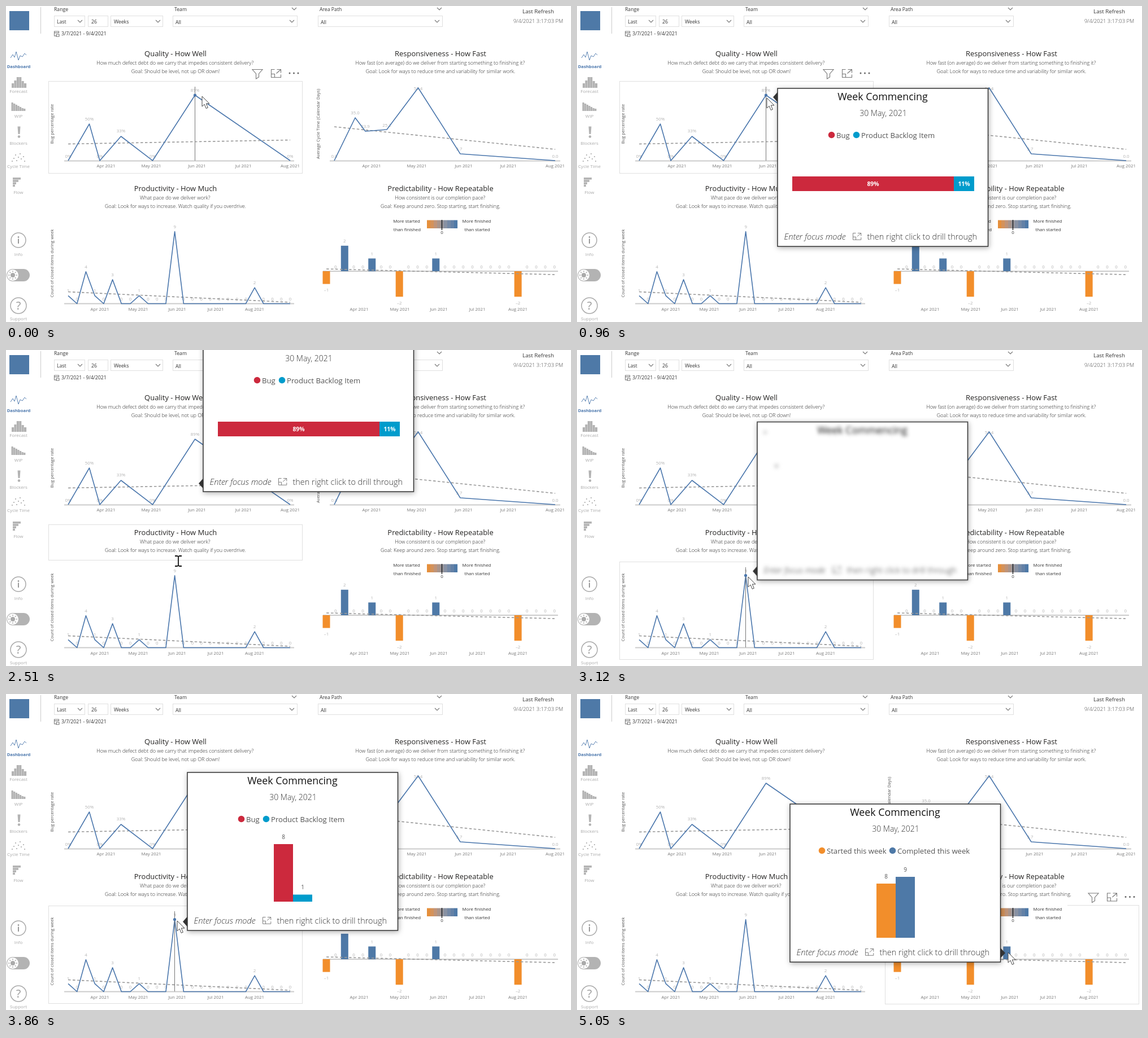
An HTML page for the animation above (5.91 s loop, 1000 px wide and 560 px high).

```html
<!DOCTYPE html>
<html lang="en">
<head>
<meta charset="utf-8">
<title>Flow metrics dashboard</title>
<style>
html, body { margin: 0; width: 100%; height: 100%; overflow: hidden; background: #fff; }
svg { display: block; width: 1000px; height: 560px; font-family: "Open Sans", "Noto Sans", sans-serif; }
text { white-space: pre; }
.mid { text-anchor: middle; }
.title { font-size: 12.95px; fill: #252423; }
.sub { font-size: 9px; font-weight: 300; fill: #222; }
.axis { font-size: 7.8px; fill: #777; }
.side { font-size: 7.5px; fill: #555; }
.val { font-size: 7.9px; fill: #b2b2b2; }
.key { font-size: 7.9px; fill: #333; }
.nav { font-size: 8px; fill: #aaa; }
.nav.on { font-size: 7.7px; font-weight: 700; fill: #4a76ac; }
.head { font-size: 8.7px; fill: #333; }
.refresh { font-size: 9.75px; fill: #333; }
.stamp { font-size: 9.4px; font-weight: 300; fill: #444; }
.week { font-size: 17.8px; fill: #111; }
.date { font-size: 14px; font-weight: 300; fill: #333; }
.legend { font-size: 13.15px; fill: #555; }
.foot { font-size: 14.45px; font-weight: 300; fill: #333; }
.foot .em { font-size: 14.8px; font-style: italic; }
.num { font-size: 10px; fill: #555; }
.pct { font-size: 10.3px; font-weight: 700; fill: #fff; }
.wait { font-size: 13.3px; fill: #b8b8b8; }
.card { fill: #fff; stroke: #333; stroke-width: 1.5; filter: drop-shadow(1px 2px 5px rgba(0, 0, 0, .32)); }
.line { fill: none; stroke: #4a76ac; stroke-width: 1.6; stroke-linejoin: round; }
.line.thin { stroke-width: .9; }
.base { stroke: #ccc; stroke-width: 2.2; }
.trend { stroke: #999; stroke-width: 1.6; stroke-dasharray: 4.5 3.5; }
.edge { fill: none; stroke: #e0e0e0; }
.ico { fill: none; stroke: #777; stroke-width: 1.1; }
.grey { fill: #b3b3b3; }
.ring { fill: none; stroke: #aaa; stroke-width: 1.5; }

.anim, .tip, .tip .body, .tip .data, .tip .load, .tip .arrow, .late {
  animation: 5.91s step-end infinite;
}
.hoverA { animation-name: hoverA; }
.hoverT { animation-name: hoverT; }
.hoverB { animation-name: hoverB; }
.hoverC { animation-name: hoverC; }
@keyframes hoverA { 0% { opacity: 1 } 41.286%, 100% { opacity: 0 } }
@keyframes hoverT { 0% { opacity: 0 } 42.47% { opacity: 1 } 52.792%, 100% { opacity: 0 } }
@keyframes hoverB { 0% { opacity: 0 } 52.792% { opacity: 1 } 82.064%, 100% { opacity: 0 } }
@keyframes hoverC { 0% { opacity: 0 } 83.249%, 100% { opacity: 1 } }

.tipA { animation-name: tipA; }
.tipA .arrow { animation-name: arrowA; }
.tipA .body { animation-name: bodyA; }
.tipA .data { animation-name: dataA; }
.tipA .load { animation-name: loadA; }
@keyframes tipA {
  0% { opacity: 0; transform: translate(373px, 146px) }
  1.184% { opacity: .4; transform: translate(373px, 146px) }
  2.369% { opacity: .75; transform: translate(373px, 146px) }
  3.384% { opacity: 1; transform: translate(373px, 146px) }
  8.291% { opacity: 1; transform: translate(355px, 146px) }
  37.733% { opacity: 1; transform: translate(355px, 147px) }
  38.917% { opacity: 1; transform: translate(349px, -29px) }
  52.792%, 100% { opacity: 0; transform: translate(349px, -29px) }
}
@keyframes arrowA { 0% { transform: none } 38.917%, 100% { transform: translateY(250px) } }
@keyframes bodyA { 0% { filter: blur(3px) } 15.228% { filter: blur(1.5px) } 16.244%, 100% { filter: none } }
@keyframes dataA { 0% { opacity: 0 } 15.228%, 100% { opacity: 1 } }
@keyframes loadA { 0% { opacity: 0 } 10.66% { opacity: 1 } 15.228%, 100% { opacity: 0 } }

.tipB { animation-name: tipB; }
.tipB .body { animation-name: bodyB; }
.tipB .data { animation-name: dataB; }
.tipB .load { animation-name: loadB; }
.tipB .date { animation: lateB 5.91s step-end infinite; }
.late { animation-name: blobs; }
@keyframes tipB {
  0% { opacity: 0; transform: translate(319px, 127.5px) }
  52.792% { opacity: 1; transform: translate(319px, 127.5px) }
  57.53% { opacity: 1; transform: translate(321px, 139px) }
  80.88%, 100% { opacity: 0; transform: translate(321px, 139px) }
}
@keyframes bodyB { 0% { filter: blur(3px) } 63.62% { filter: blur(1.2px) } 65.313%, 100% { filter: none } }
@keyframes dataB { 0% { opacity: 0 } 62.098%, 100% { opacity: 1 } }
@keyframes loadB { 0% { opacity: 0 } 57.53% { opacity: 1 } 62.098%, 100% { opacity: 0 } }
@keyframes lateB { 0% { opacity: 0 } 57.53%, 100% { opacity: 1 } }
@keyframes blobs { 0% { opacity: 1 } 55.161%, 100% { opacity: 0 } }

.tipC { animation-name: tipC; }
.tipC .body { animation-name: bodyC; }
.tipC .data { animation-name: dataC; }
.tipC .load { animation-name: loadC; }
@keyframes tipC {
  0% { opacity: 0; transform: translate(377px, 195px) }
  83.249%, 100% { opacity: 1; transform: translate(377px, 195px) }
}
@keyframes bodyC { 0% { filter: blur(3px) } 84.264% { filter: blur(1.2px) } 85.448%, 100% { filter: none } }
@keyframes dataC { 0% { opacity: 0 } 84.264%, 100% { opacity: 1 } }
@keyframes loadC { 0% { opacity: 1 } 84.264%, 100% { opacity: 0 } }

.mouse { animation-name: mouse; }
.pointer { animation-name: pointer; }
.beam { animation-name: beam; }
@keyframes mouse {
  0% { transform: translate(347px, 160px) }
  3.384% { transform: translate(348px, 161px) }
  8.291% { transform: translate(337px, 162px) }
  10.66% { transform: translate(333px, 162px) }
  12.86% { transform: translate(336px, 163px) }
  36.548% { transform: translate(335px, 178px) }
  37.733% { transform: translate(333px, 200px) }
  38.917% { transform: translate(330px, 234px) }
  40.102% { transform: translate(323px, 282px) }
  41.286% { transform: translate(313px, 333px) }
  42.47% { transform: translate(305px, 374px) }
  43.486% { transform: translate(303px, 386px) }
  44.67% { transform: translate(301px, 394px) }
  45.854% { transform: translate(300px, 398px) }
  47.039% { transform: translate(301px, 400px) }
  48.223% { transform: translate(302px, 401px) }
  49.408% { transform: translate(303px, 402px) }
  80.88% { transform: translate(420px, 422px) }
  82.064% { transform: translate(610px, 446px) }
  83.249% { transform: translate(738px, 458px) }
  84.264% { transform: translate(759px, 459px) }
  85.448%, 100% { transform: translate(763px, 458px) }
}
@keyframes pointer { 0% { opacity: 1 } 41.286% { opacity: 0 } 44.67%, 100% { opacity: 1 } }
@keyframes beam { 0% { opacity: 0 } 41.286% { opacity: 1 } 44.67%, 100% { opacity: 0 } }
</style>
</head>
<body>
<svg viewBox="0 0 1000 560"></svg>
<script>
const BLUE = '#4e79a7', ORANGE = '#f28e2b', RED = '#cc293d', CYAN = '#009ccc';
const MONTHS = ['Apr', 'May', 'Jun', 'Jul', 'Aug'];

const text = (x, y, s, cls) => `<text x="${x}" y="${y}" class="${cls}">${s}</text>`;
const mid = (x, y, s, cls) => text(x, y, s, 'mid ' + cls);
const rect = (x, y, w, h, fill) => `<rect x="${x}" y="${y}" width="${w}" height="${h}" fill="${fill}"/>`;
const edge = (x, y, w, h) => `<rect class="edge" x="${x}" y="${y}" width="${w}" height="${h}"/>`;
const seg = (x1, y1, x2, y2, cls) => `<line x1="${x1}" y1="${y1}" x2="${x2}" y2="${y2}" class="${cls}"/>`;
const dot = (x, y, r, fill) => `<circle cx="${x}" cy="${y}" r="${r}" fill="${fill}"/>`;
const path = (d, cls = 'ico') => `<path d="${d}" class="${cls}"/>`;
const poly = (pts, cls = 'line') => `<polyline class="${cls}" points="${pts.join(' ')}"/>`;
const side = (x, y, s) => `<text class="mid side" transform="translate(${x} ${y}) rotate(-90)">${s}</text>`;
const months = (xs, y) => xs.map((x, i) => mid(x, y, MONTHS[i] + ' 2021', 'axis')).join('');
const heading = (x, y, title, a, b) =>
  mid(x, y, title, 'title') + mid(x - .7, y + 15.3, a, 'sub') + mid(x, y + 30.3, b, 'sub');
const chevron = (x, y) => path(`M${x - 4} ${y - 2}l4 4 4-4`);
const focusIcon = (x, y, k) => `<g transform="translate(${x} ${y}) scale(${k})">` +
  path('M6 0H0V14H17V9M10 0H17V6M17 0L9 7M0 8H6V14') + '</g>';
const tools = (dx, dy) => `<g transform="translate(${dx} ${dy})">` +
  path('M436 112.500H454L447.500 120V126L442.500 129V120Z') + focusIcon(469.500, 112.500, 1) +
  [502, 509.500, 517].map(x => dot(x, 119, 1.5, '#666')).join('') + '</g>';

function header() {
  const boxes = [[85, 55], [145, 36], [185, 93], [295, 221], [552, 221]];
  return rect(6, 9, 35, 34, BLUE) +
    '<path d="M61.500 2V49" stroke="#ccc"/>' +
    boxes.map(([x, w]) => edge(x + .5, 17.5, w - 1, 19)).join('') +
    [[131, 27], [269, 27], [506, 27], [763, 27], [510, 5], [767, 5]].map(p => chevron(...p)).join('') +
    text(85, 8.5, 'Range', 'head') + text(298, 8.5, 'Team', 'head') + text(555, 8.5, 'Area Path', 'head') +
    text(90, 30.5, 'Last', 'head') + text(151, 30.5, '26', 'head') + text(191, 30.5, 'Weeks', 'head') +
    text(300, 31.5, 'All', 'head') + text(557, 31.5, 'All', 'head') +
    path('M90 53H85.500V45H93.500V48M85.500 47.500H93.500M89 50H94V54H89Z') +
    text(98, 52, '3/7/2021 - 9/4/2021', 'head') +
    mid(942, 13, 'Last Refresh', 'refresh') + mid(942, 30, '9/4/2021 3:17:03 PM', 'stamp');
}

function nav() {
  const names = [['Forecast', 154], ['WIP', 197.5], ['Blockers', 246], ['Cycle Time', 287],
    ['Flow', 333], ['Info', 443], ['Support', 557]];
  const bars = (list, x, y, step) =>
    list.map((h, i) => rect(x + i * step, y - h, step - .3, h, '#b3b3b3')).join('');
  const rays = [...Array(8)].map((_, i) =>
    `<path d="M0-5.500V-8" transform="translate(12 477) rotate(${i * 45})" stroke="#aaa" stroke-width="1.4"/>`).join('');
  return mid(22.5, 109.5, 'Dashboard', 'nav on') +
    names.map(([s, y]) => mid(22, y, s, 'nav')).join('') +
    poly(['8,92', '12,86', '15,91', '18,81', '22,96', '25,88', '29,90', '33,84', '36,87'], 'line thin') +
    bars([8, 13, 19, 19, 12, 8], 10, 145, 4.4) +
    bars([15, 13, 11, 9, 7, 5, 4], 9.5, 186, 3.6) +
    path('M20.500 213.500H25.500L24.500 227H21.500Z', 'grey') + dot(23, 231.5, 2.3, '#b3b3b3') +
    [[11, 275], [14, 270], [17, 264], [19, 274], [22, 268], [25, 262], [27, 271], [31, 267], [33, 275]]
      .map(([x, y]) => dot(x, y, 1.1, '#aaa')).join('') +
    [14, 10, 6, 4].map((w, i) => rect(12, 304 + i * 4.2, w, 3.6, '#b3b3b3')).join('') +
    '<circle class="ring" cx="22" cy="415" r="13"/>' + dot(22, 409.5, 1.3, '#888') +
    '<path d="M22 412.500V421" stroke="#888" stroke-width="1.7"/>' +
    '<rect class="grey" x="1" y="466" width="41" height="22" rx="11"/>' +
    dot(12, 477, 10, '#fff') + dot(12, 477, 4, '#aaa') + rays +
    '<circle class="ring" cx="22" cy="531" r="14"/>' +
    '<text x="22" y="538" class="mid" font-size="20" fill="#999">?</text>';
}

function lineChart(pts, labels, trend, x0, x1) {
  return labels.map(([x, y, s]) => mid(x, y, s, 'val')).join('') +
    seg(x0, 274.5, x1, 274.5, 'base') + seg(...trend, 'trend') + poly(pts);
}

function quality() {
  return heading(300, 89, 'Quality - How Well',
    'How much defect debt do we carry that impedes consistent delivery?',
    'Goal: Should be level, not up OR down!') +
    side(84, 209, 'Bug percentage rate') +
    lineChart(['110,274', '147.5,209', '166,274', '203.5,231', '259.5,274', '334.5,158', '503,274'],
      [[110, 269, '0%'], [147.5, 202.5, '50%'], [166, 269, '0%'], [203.5, 223.5, '33%'],
       [259.5, 269, '0%'], [334.5, 152, '89%'], [503, 269, '0%']],
      [110, 244.5, 503, 237.5], 103, 510) +
    months([177, 257, 338, 420, 503], 286);
}

function response() {
  return heading(769, 89, 'Responsiveness - How Fast',
    'How fast (on average) do we deliver from starting something to finishing it?',
    'Goal: Look for ways to reduce time and variability for similar work.') +
    side(554.5, 209, 'Average Cycle Time (Calendar Days)') +
    lineChart(['581,274', '618,198', '636,222', '674,219', '729.5,145', '804,262', '972,274'],
      [[581, 269, '0.0'], [618, 191.5, '35.0'], [636, 215.5, '23.9'], [674, 213.5, '25.2'],
       [729.5, 149, '53.4'], [802, 256, '5.7'], [972, 269, '0.0']],
      [581, 214, 972, 254], 573, 981) +
    months([647, 727, 810, 889, 972], 286);
}

function productivity() {
  const spikes = { 0: 1, 2: 4, 3: 1, 5: 3, 8: 1, 12: 9, 21: 2 };
  const pts = [...Array(26)].map((_, i) => [110 + i * 15.72, 527.5 - 14.2 * (spikes[i] || 0), spikes[i] || 0]);
  return heading(300, 328, 'Productivity - How Much', 'What pace do we deliver work?',
    'Goal: Look for ways to increase. Watch quality if you overdrive.') +
    side(84, 456, 'Count of closed items during week') +
    pts.map(([x, y, v]) => mid(x, y - 6, v, 'val')).join('') +
    seg(103, 527.5, 510, 527.5, 'base') + seg(110, 506.5, 503, 525, 'trend') +
    poly(pts.map(([x, y]) => x + ',' + y)) +
    months([166, 234, 303, 371, 440], 539.5);
}

function predictability() {
  const net = { 0: -1, 2: 2, 5: 1, 8: -2, 12: 1, 21: -2 };
  const cols = ['#e58f3c', '#d4925a', '#c09479', '#aa958b', '#96959b', '#8891a3', '#7489a6', '#6381a6', BLUE];
  let out = '', labels = '';
  for (let i = 0; i < 26; i++) {
    const x = 567 + i * 16.15, v = net[i] || 0, h = Math.abs(v) * 22.6;
    if (v) out += rect(x - 6.5, v > 0 ? 470 - h : 470, 13, h, v > 0 ? BLUE : ORANGE);
    labels += mid(x, v < 0 ? 470 + h + 13.5 : 464.5 - h, v < 0 ? '–' + -v : v, 'val');
  }
  return heading(769, 328, 'Predictability - How Repeatable', 'How consistent is our completion pace?',
    'Goal: Keep around zero. Stop starting, start finishing.') +
    rect(680, 370, 188, 36, '#fff') +
    mid(709, 384, 'More started', 'key') + mid(710, 399, 'than finished', 'key') +
    mid(833, 384, 'More finished', 'key') + mid(834, 399, 'than started', 'key') +
    cols.map((c, i) => rect(745 + i * 6, 379.5, 6.1, 14.5, c)).join('') +
    '<path d="M771.500 379V397" stroke="#111" stroke-width="1.3"/>' + mid(771.5, 404, '0', 'key') +
    seg(561, 470, 977, 470, 'base') + out + labels + seg(567, 466, 971, 476, 'trend') +
    months([625, 697, 766, 834, 906], 540);
}

const cross = (x, y1, y2, y) => `<path d="M${x} ${y1}V${y2}" stroke="#777"/>` + dot(x, y, 2.6, '#4a76ac');
const legend = (x1, c1, s1, x2, c2, s2) =>
  dot(x1, 82.5, 5.8, c1) + text(x1 + 8.5, 87.5, s1, 'legend') +
  dot(x2, 82.5, 5.8, c2) + text(x2 + 8.5, 87.5, s2, 'legend');
const columns = (base, h1, c1, v1, h2, c2, v2) =>
  rect(153, base - h1, 34, h1, c1) + mid(170, base - h1 - 9.5, v1, 'num') +
  rect(187, base - h2, 34, h2, c2) + mid(204, base - h2 - 9.5, v2, 'num');

function tip(name, arrow, data, extra = '') {
  const spin = [[91.5, 101.5, 1.3], [94, 97.5, 1.6], [98.5, 95, 1.8], [103.5, 95.5, 2], [105, 99.5, 1.6]];
  return `<g class="tip tip${name}"><rect class="card" width="372.5" height="280"/>
    <path class="arrow" d="${arrow}" fill="#333"/>
    <g class="body">
      ${mid(186, 20.5, 'Week Commencing', 'week')}${mid(187, 49, '30 May, 2021', 'date')}
      <g class="foot">${text(11.5, 267.5, 'Enter focus mode', 'em')}
      ${text(158.5, 267.5, 'then right click to drill through', '')}</g>
      ${focusIcon(133.5, 256.5, .84)}
      <g class="data">${data}</g>${extra}
    </g>
    <g class="load">${spin.map(([x, y, r]) => dot(x, y, r, '#555')).join('')}
      ${text(113, 108, 'Loading report page tooltip', 'wait')}
      <path d="M26 70Q33 60 41 70" fill="none" stroke="#bbb" stroke-width="4" style="filter:blur(2.500px)"/></g>
  </g>`;
}

const leftArrow = y => `M0 ${y - 9}L-8 ${y} 0 ${y + 9}Z`;
const share = rect(26, 156, 286, 26, RED) + rect(312, 156, 36, 26, CYAN) +
  mid(169, 173, '89%', 'pct') + mid(330, 173, '11%', 'pct');
const items = legend(95.5, RED, 'Bug', 139.5, CYAN, 'Product Backlog Item');

document.querySelector('svg').innerHTML =
  `<g class="anim hoverA">${edge(75.5, 133.5, 449, 163)}${tools(0, 0)}</g>` +
  `<g class="anim hoverT">${edge(75.5, 309.5, 449, 63)}</g>` +
  `<g class="anim hoverB">${edge(75.5, 375.5, 449, 173)}${tools(0, 242)}</g>` +
  `<g class="anim hoverC">${edge(545.5, 374.5, 449, 175)}${tools(469, 240.5)}</g>` +
  header() + nav() + quality() + response() + productivity() + predictability() +
  `<g class="anim hoverA">${cross(334.5, 143, 274, 158)}</g>` +
  `<g class="anim hoverB">${cross(298.5, 385, 527, 399.5)}</g>` +
  tip('A', leftArrow(15.5), items + share) +
  tip('B', leftArrow(264.5), items + columns(229, 102, RED, 8, 12.5, CYAN, 1),
    `<g class="late">${dot(14, 18.5, 3, '#ccc')}${dot(34, 78, 3.5, '#ccc')}</g>`) +
  tip('C', 'M372.5 255L381 264 372.5 273Z',
    legend(56.5, ORANGE, 'Started this week', 181.5, BLUE, 'Completed this week') +
    columns(237, 96, ORANGE, 8, 108, BLUE, 9)) +
  `<g class="anim mouse">
    <path class="anim pointer" d="M0 0V18L4.200 14.200 7.200 21.500 10.300 20.200 7.300 13H13Z" fill="#fff" stroke="#333" stroke-width=".9"/>
    <path class="anim beam" d="M-6-9H-2L0-8 2-9H6M0-8V8M-6 9H-2L0 8 2 9H6" fill="none" stroke="#111" stroke-width="1.8"/>
  </g>`;
</script>
</body>
</html>
```
